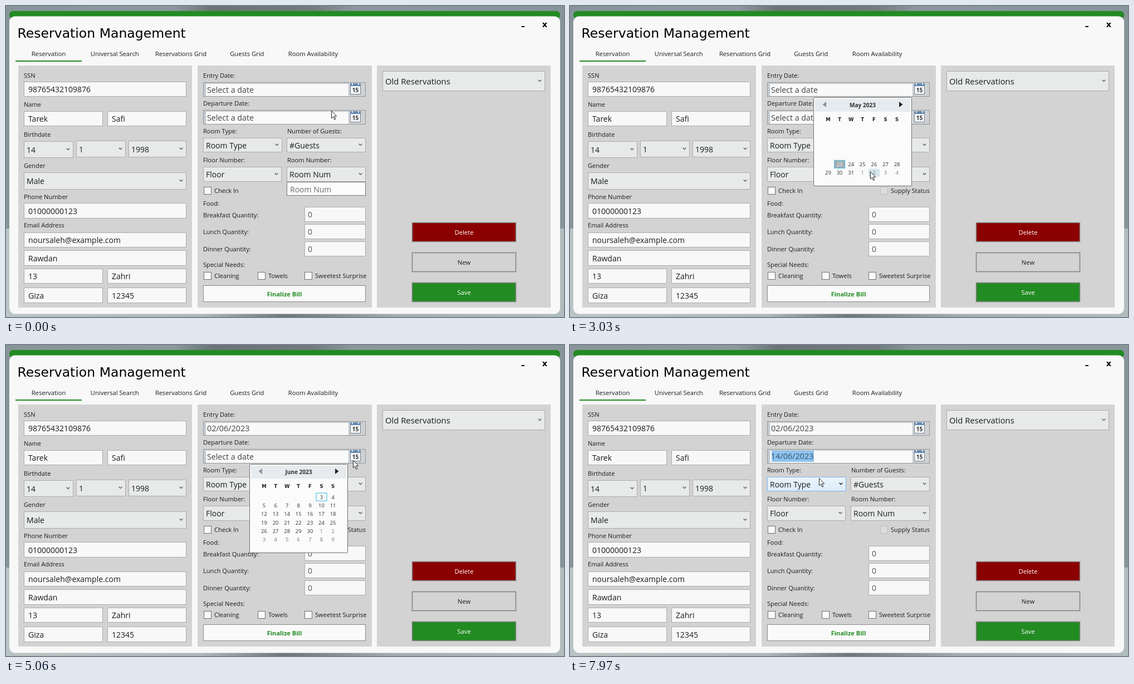
An HTML page that plays this animation: 1002x559 px, repeating every 8 s.

```html
<!DOCTYPE html>
<html lang="en">
<head>
<meta charset="utf-8">
<title>Reservation Management</title>
<style>
  html, body { margin: 0; width: 100%; height: 100%; overflow: hidden; }
  svg { display: block; width: 1002px; height: 559px; font-family: "Open Sans", "Noto Sans", sans-serif; }
  .title { font-family: "DejaVu Sans", sans-serif; }
  .bold { font-weight: 700; }
  .mid { text-anchor: middle; }
</style>
</head>
<body>
<svg viewBox="0 0 1002 559">
  <defs>
    <linearGradient id="sky">
      <stop offset="0" stop-color="#87959a"/><stop offset=".3" stop-color="#8d999d"/>
      <stop offset=".37" stop-color="#6a7477"/><stop offset=".55" stop-color="#727c7f"/>
      <stop offset=".62" stop-color="#8b979b"/><stop offset="1" stop-color="#87959b"/>
    </linearGradient>
    <linearGradient id="floor">
      <stop offset="0" stop-color="#b9c4c5"/><stop offset=".35" stop-color="#aeb8ba"/>
      <stop offset=".5" stop-color="#6d7678"/><stop offset=".7" stop-color="#a4aeb0"/>
      <stop offset="1" stop-color="#b0bcbd"/>
    </linearGradient>
    <linearGradient id="hot" x2="0" y2="1">
      <stop offset="0" stop-color="#ecf4fc"/><stop offset="1" stop-color="#dcecfc"/>
    </linearGradient>
  </defs>
  <g id="form"></g>
  <g id="live"></g>
  <path id="cursor" d="M0 0V13.2L3 10.4L5.2 15.6L7.3 14.7L5.1 9.6H9.2Z" fill="#fff" stroke="#222" stroke-width="1"/>
</svg>
<script>
const LOOP = 8000, GREEN = '#228b22', GREY = '#d3d3d3', INK = '#1c1c1c';
const $ = id => document.getElementById(id);

const fillRect = (x, y, w, h, fill, more = '') =>
  `<rect x="${x}" y="${y}" width="${w}" height="${h}" fill="${fill}" ${more}/>`;
// Edges are given as the outer pixel bounds of a 1px border.
const box = (x1, y1, x2, y2, fill, stroke = '#acacac', more = '') =>
  fillRect(x1 + .5, y1 + .5, x2 - x1 - 1, y2 - y1 - 1, fill, `stroke="${stroke}" ${more}`);
const text = (x, y, s, size = 11.1, fill = INK, cls = '') =>
  `<text x="${x}" y="${y}" font-size="${size}" fill="${fill}" class="${cls}">${s}</text>`;

const field = (x1, y1, x2, y2, s) =>
  box(x1, y1, x2, y2, '#f8f8f8') + text(x1 + 8, y2 - 8, s, 14);
const combo = ([x1, y1, x2, y2, s, size = 14], hot) =>
  box(x1, y1, x2, y2, hot ? 'url(#hot)' : '#e8eaea', hot ? '#7eb4ea' : '#acacac') +
  text(x1 + 5, (y1 + y2) / 2 + 5.5, s, size) +
  `<path d="M${x2 - 12.3} ${(y1 + y2) / 2 - 2.2}l2.8 2.8l2.8-2.8" fill="none" stroke="${hot ? '#111' : '#555'}" stroke-width="1.3"/>`;
const check = (x, y, s, off) =>
  box(x, y, x + 14, y + 14, off ? '#dcdcdc' : '#fafafa', off ? '#bdbdbd' : '#707070') +
  text(x + 19, y + 11, s);
const button = (y, s, fill, color) =>
  box(729, y, 916, y + 35, fill, '#808080', 'stroke-width="1.5"') +
  text(822.5, y + 22, s, 11.3, color, 'mid');

const combos = [
  [32, 243, 121, 273, '14'], [126, 242, 215, 272, '1'], [220, 242, 324, 272, '1998'],
  [32, 299, 324, 330, 'Male'], [676, 117, 968, 153, 'Old Reservations', 14.8],
  [354, 237, 496, 263, 'Room Type'], [504, 237, 646, 263, '#Guests'],
  [354, 289, 495, 316, 'Floor'], [504, 289, 646, 316, 'Room Num']
];

const tabs = ['Reservation', 'Universal Search', 'Reservations Grid', 'Guests Grid', 'Room Availability'];

const labels = [
  [32, 129, 'SSN'], [32, 181, 'Name'], [32, 235, 'Birthdate'], [32, 291, 'Gender'],
  [32, 347, 'Phone Number'], [32, 398, 'Email Address'],
  [354, 129, 'Entry Date:'], [354, 179, 'Departure Date:'],
  [354, 229, 'Room Type:'], [505, 229, 'Number of Guests:'],
  [354, 281, 'Floor Number:'], [505, 281, 'Room Number:'], [354, 359, 'Food:'],
  [354, 380, 'Breakfast Quantity:'], [354, 410, 'Lunch Quantity:'],
  [354, 441, 'Dinner Quantity:'], [354, 469, 'Special Needs:']
];

$('form').innerHTML =
  fillRect(0, 0, 1002, 559, 'url(#sky)') +
  fillRect(0, 400, 1002, 159, 'url(#floor)') +
  fillRect(6, 9, 989, 14, GREEN, 'rx="7"') +
  fillRect(6, 18.5, 989, 535, '#f8f8f8', 'rx="10"') +
  text(20.5, 57, 'Reservation Management', 23.55, '#000', 'title') +
  fillRect(925.5, 36, 5.5, 2, '#000') +
  text(967.5, 38.3, 'x', 14.5, '#000', 'title bold mid') +
  fillRect(17, 98, 119, 2, GREEN) +
  fillRect(22, 107, 312, 435, GREY) +
  fillRect(344, 107, 313, 435, GREY) +
  fillRect(666, 107, 312, 435, GREY) +
  tabs.map((s, i) => text(76.5 + 118.75 * i, 90, s, 11.2, INK, 'mid')).join('') +
  labels.map(l => text(...l)).join('') +
  field(32, 136, 324, 163, '98765432109876') +
  field(32, 189, 174, 216, 'Tarek') + field(182, 189, 324, 216, 'Safi') +
  field(32, 354, 324, 382, '01000000123') +
  field(32, 407, 324, 434, 'noursaleh@example.com') +
  field(32, 439, 324, 467, 'Rawdan') +
  field(32, 472, 174, 499, '13') + field(182, 472, 324, 499, 'Zahri') +
  field(32, 506, 174, 534, 'Giza') + field(182, 506, 324, 534, '12345') +
  combos.map(c => combo(c)).join('') +
  check(355, 325, 'Check In') + check(557, 325, 'Supply Status', true) +
  check(355, 478, 'Cleaning') + check(452, 478, 'Towels') + check(536, 478, 'Sweetest Surprise') +
  [361, 392, 423].map(y => box(536, y, 646, y + 27, '#f8f8f8') + text(542, y + 19, '0', 14, '#555')).join('') +
  box(354, 502, 646, 532, '#fafafa', '#8a8a8a') +
  text(500, 522, 'Finalize Bill', 11.1, GREEN, 'bold mid') +
  button(389, 'Delete', '#8b0000', '#fff') +
  button(443, 'New', GREY, INK) +
  button(497, 'Save', GREEN, '#fff');

function datePicker(y, date, marked, hot) {
  return box(354, y, 646, y + 26, '#cfd1d3', '#929598') +
    fillRect(356, y + 2, 260, 23, '#bfc7cf') +
    fillRect(359, y + 3, 256, 22, '#f9f9f9') +
    (marked ? fillRect(362, y + 3, 76, 20, '#8fc3ee') : '') +
    (date ? text(361, y + 18, date, 14.4, marked ? '#34556f' : '#444')
          : text(361, y + 19, 'Select a date', 14.2, '#444')) +
    box(618, y + 2, 637, y + 22, hot ? '#c3e2f5' : '#f4f6f8', '#77838f') +
    fillRect(618, y + 2, 19, 5, hot ? '#2c86c2' : '#6388ad') +
    fillRect(621, y + 2, 2, 3, '#dfe8f0') + fillRect(632, y + 2, 2, 3, '#dfe8f0') +
    text(627.5, y + 18, '15', 10, '#333', 'bold mid');
}

// first: day number of the top-left cell; from: earliest day that can be chosen
function calendar(top, { title, first, from, days, solid }, picked, [mx, my]) {
  let out = box(437, top, 614, top + 160, '#fbfbfb', '#717171', 'rx="1"') +
    fillRect(440, top + 3, 171, 23, '#e6ebef') +
    text(525.5, top + 17.5, title, 10.1, '#333', 'bold mid') +
    `<path d="M460 ${top + 8}v10l-6.5-5z" fill="#8b9196"/>` +
    `<path d="M591 ${top + 8}v10l6.5-5z" fill="#222"/>`;
  [...'MTWTFSS'].forEach((d, i) =>
    out += text(463.5 + 20.6 * i, top + 43, d, 8.6, '#222', 'title bold mid'));
  for (let i = 0; i < 42; i++) {
    const n = first + i;
    if (n < from) continue;
    const x = 463.5 + 20.6 * (i % 7), y = top + 59.2 + 15.3 * (i / 7 | 0);
    const today = n === from && !picked;
    const over = Math.abs(mx - x) < 10.3 && Math.abs(my - y) < 7.6;
    if (n === picked) out += fillRect(x - 10, y - 7, 20, 14, '#b0d5e5');
    else if (over) out += fillRect(x - 10, y - 7, 20, 14, '#d3e4ec');
    if (today) out += fillRect(x - 9.5, y - 7, 19, 14, solid ? '#a3a9ae' : 'none', 'stroke="#55c5e3" stroke-width="1.2"');
    out += text(x, y + 3.5, n > days ? n - days : n, 9.5,
      today && solid ? '#fff' : n > days ? '#7c7c7c' : '#333', 'mid');
  }
  return out;
}

const may = { title: 'May 2023', first: -6, from: 23, days: 31, solid: true };
const june = { title: 'June 2023', first: -2, from: 3, days: 30 };

// time, x, y of the pointer; it eases between neighbouring stops
const stops = [
  [0, 584, 188], [60, 584, 188], [560, 630, 156], [840, 630, 156], [1270, 630, 143],
  [1650, 630, 143], [2450, 554, 268], [2500, 554, 268], [3120, 538, 299],
  [3600, 538, 299], [4230, 623, 207], [5060, 623, 207], [5860, 534, 308],
  [5920, 534, 308], [6290, 518, 312], [6460, 505, 303], [7530, 505, 303],
  [7970, 447, 239], [LOOP, 447, 239]
];

function pointer(t) {
  const i = stops.findIndex(s => s[0] > t);
  const [t0, x0, y0] = stops[i - 1], [t1, x1, y1] = stops[i];
  const u = (t - t0) / (t1 - t0), e = u * u * (3 - 2 * u);
  return [x0 + (x1 - x0) * e, y0 + (y1 - y0) * e];
}

function draw(t) {
  const during = (a, b) => t >= a && t < b;
  const at = pointer(t), [x, y] = at;
  const mayOpen = during(1410, 3550), juneOpen = during(4600, 7130);
  let out = datePicker(137, t >= 3430 && '02/06/2023', during(3670, 4600), during(840, 1410)) +
    datePicker(187, t >= 6950 && '14/06/2023', t >= 7250, during(4290, 4600));
  if (during(3600, 4600) || t >= 7250)
    out += combos.filter(c => x >= c[0] && x < c[2] && y >= c[1] && y < c[3])
      .map(c => combo(c, true)).join('');
  const tip = Math.min(1, 1 - (t - 60) / 200);
  if (tip > 0)
    out += `<g opacity="${tip}">` + box(504, 316, 646, 341, '#fcfcfc', '#777') +
      text(510, 335, 'Room Num', 14, '#6b6b6b') + '</g>';
  if (mayOpen) out += calendar(164, may, t >= 3430 && 33, at);
  if (juneOpen) out += calendar(214, june, t >= 6950 && 14, at);
  $('live').innerHTML = out;
  $('cursor').setAttribute('transform', `translate(${x + .5} ${y + .5})`);
}

const start = performance.now();
function tick(now) {
  draw(Math.max(0, now - start) % LOOP);
  requestAnimationFrame(tick);
}
draw(0);
requestAnimationFrame(tick);
</script>
</body>
</html>
```
